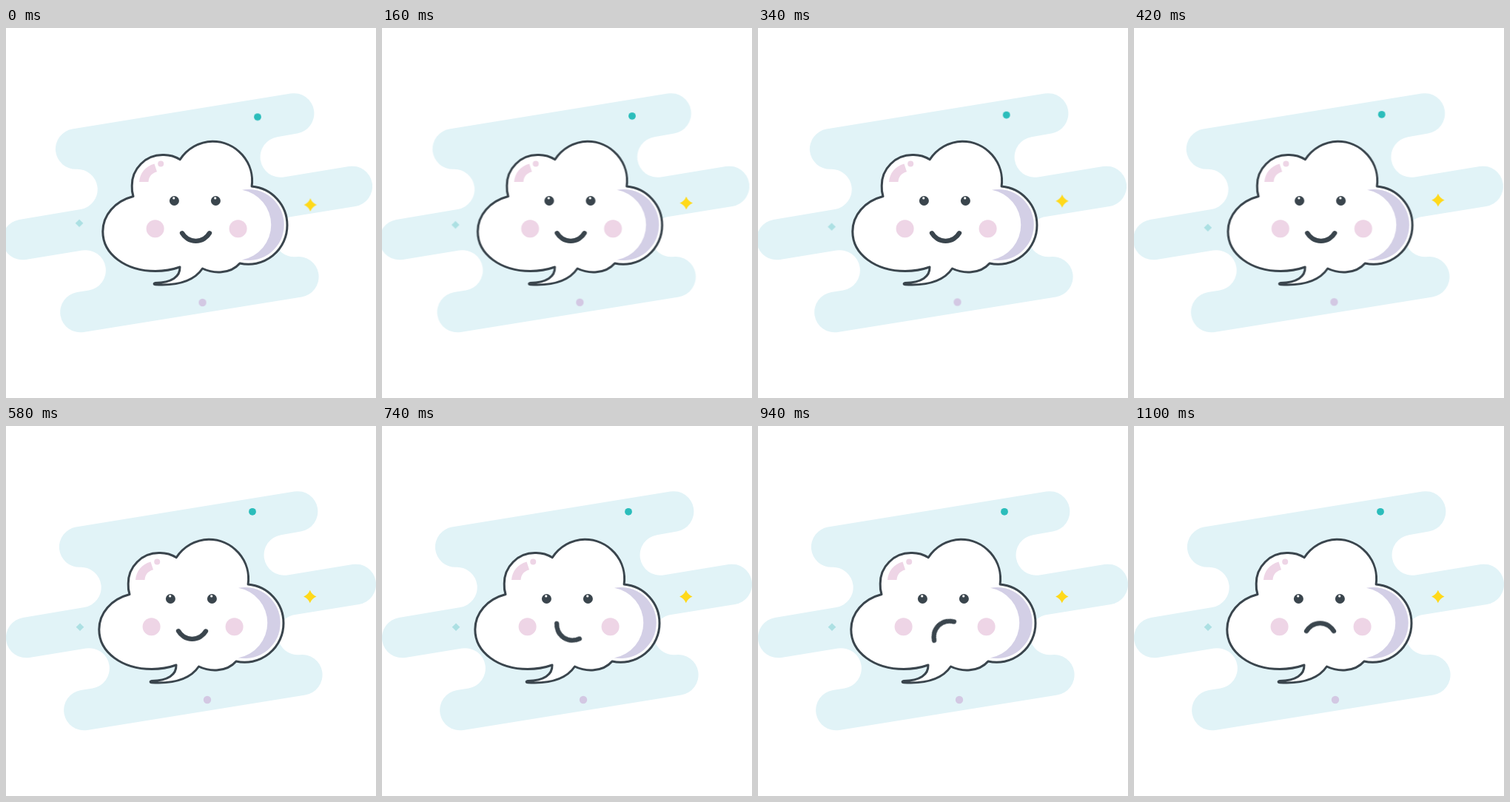
An HTML page that plays this animation: 500x500 px, repeating every 1800 ms.

```html
<!DOCTYPE html>
<html lang="en">
<head>
<meta charset="utf-8">
<title>Moody cloud</title>
<style>
  html, body { margin: 0; width: 100%; height: 100%; overflow: hidden; background: #fff; }
  svg { display: block; width: 100%; height: 100%; }

  .drift { animation: drift 1800ms infinite; }
  .mouth { transform-origin: 251.5px 277.2px; animation: frown 1800ms infinite; }

  .back    { --x: -5px;   --y: 0px; }
  .cloud   { --x: 5px;    --y: 0px; }
  .teal    { --x: 7px;    --y: 4.4px; }
  .lilac   { --x: -6.5px; --y: 1px; }
  .diamond { --x: -1px;   --y: -8px; }
  .star    { --x: .5px;   --y: 8.5px; }

  @keyframes drift {
    0% { transform: translate(var(--x), var(--y)); animation-timing-function: linear; }
    31.111%, 100% { transform: translate(0, 0); }
  }
  @keyframes frown {
    0%, 31.111% { transform: rotate(0deg); animation-timing-function: cubic-bezier(.47, 0, .66, 1); }
    61.111%, 100% { transform: rotate(180deg); }
  }
</style>
</head>
<body>
<svg viewBox="0 0 500 500">
  <path class="drift back" fill="#e1f3f7" d="M94.6 136.6
    A27.3 27.3 0 0 0 100.2 190.8
    A27.3 27.3 0 0 1 105.9 245
    L22.9 259 A27.3 27.3 0 0 0 31.7 313
    L108.1 300.5 A27.3 27.3 0 0 1 116.9 354.5
    L101.1 357 A27.3 27.3 0 0 0 109.9 411
    L404.4 363.4 A27.3 27.3 0 0 0 396 309.2
    A27.3 27.3 0 0 1 387.6 255.5
    L477.1 241 A27.3 27.3 0 0 0 468.3 187
    L380.4 201.5 A27.3 27.3 0 0 1 371.6 147.3
    L398.4 142.5 A27.3 27.3 0 0 0 389.6 88.5 Z"/>

  <circle class="drift teal" cx="333" cy="115.8" r="4.9" fill="#2bbdbb"/>
  <circle class="drift lilac" cx="272" cy="370" r="5.2" fill="#d3c8e3"/>
  <path class="drift diamond" fill="#ace0e3" d="M100 266.5l5.3 5.3-5.3 5.3-5.3-5.3z"/>
  <path class="drift star" fill="#ffd91a" d="M410.8 221.8
    Q413.3 228 419.5 230.5 Q413.3 233 410.8 239.2
    Q408.3 233 402.1 230.5 Q408.3 228 410.8 221.8Z"/>

  <g class="drift cloud">
    <path fill="#fff" stroke="#3a454d" stroke-width="3" stroke-linejoin="round" d="M167 227.5
      C142 234 125.8 253 125.8 275
      C125.8 306 157 328.5 197 328.5
      C209 328.5 220 326.5 230 323
      C230.5 336 219 344 197 344.5
      C194.5 345 194.5 346.7 197 346.7
      C228 348.5 249 342 260.5 325
      C275 332 298 333 311 318
      A52.5 52.5 0 0 0 375 266.5
      A52.5 52.5 0 0 0 327.1 214
      A53.5 53.5 0 0 0 274 153.2
      A53.5 53.5 0 0 0 230.2 177.8
      A41.2 41.2 0 0 0 206.5 171.6
      A41.2 41.2 0 0 0 165.2 213
      A41.2 41.2 0 0 0 167 227.5Z"/>
    <path fill="#d3cfe6" d="M314 218.8 A48 48 0 1 1 314 313.2 A48 48 0 0 0 314 218.8Z"/>

    <g fill="#eed5e6">
      <path d="M175 208C176 196 183 187 195.5 183.4L199 194.3C192 196 188 201 187.5 208Z"/>
      <circle cx="204.2" cy="183.6" r="4"/>
      <circle cx="196.6" cy="271.3" r="12"/>
      <circle cx="308.6" cy="271.3" r="12"/>
    </g>

    <g fill="#3a454d">
      <circle cx="222.4" cy="233.5" r="6.5"/>
      <circle cx="278.4" cy="233.5" r="6.5"/>
    </g>
    <g fill="#fff">
      <circle cx="221.7" cy="229.9" r="1.6"/>
      <circle cx="277.7" cy="229.9" r="1.6"/>
    </g>

    <path class="mouth" fill="none" stroke="#3a454d" stroke-width="6.3" stroke-linecap="round"
      d="M233 277.2A21.4 21.4 0 0 0 270 277.2"/>
  </g>
</svg>
</body>
</html>
```
